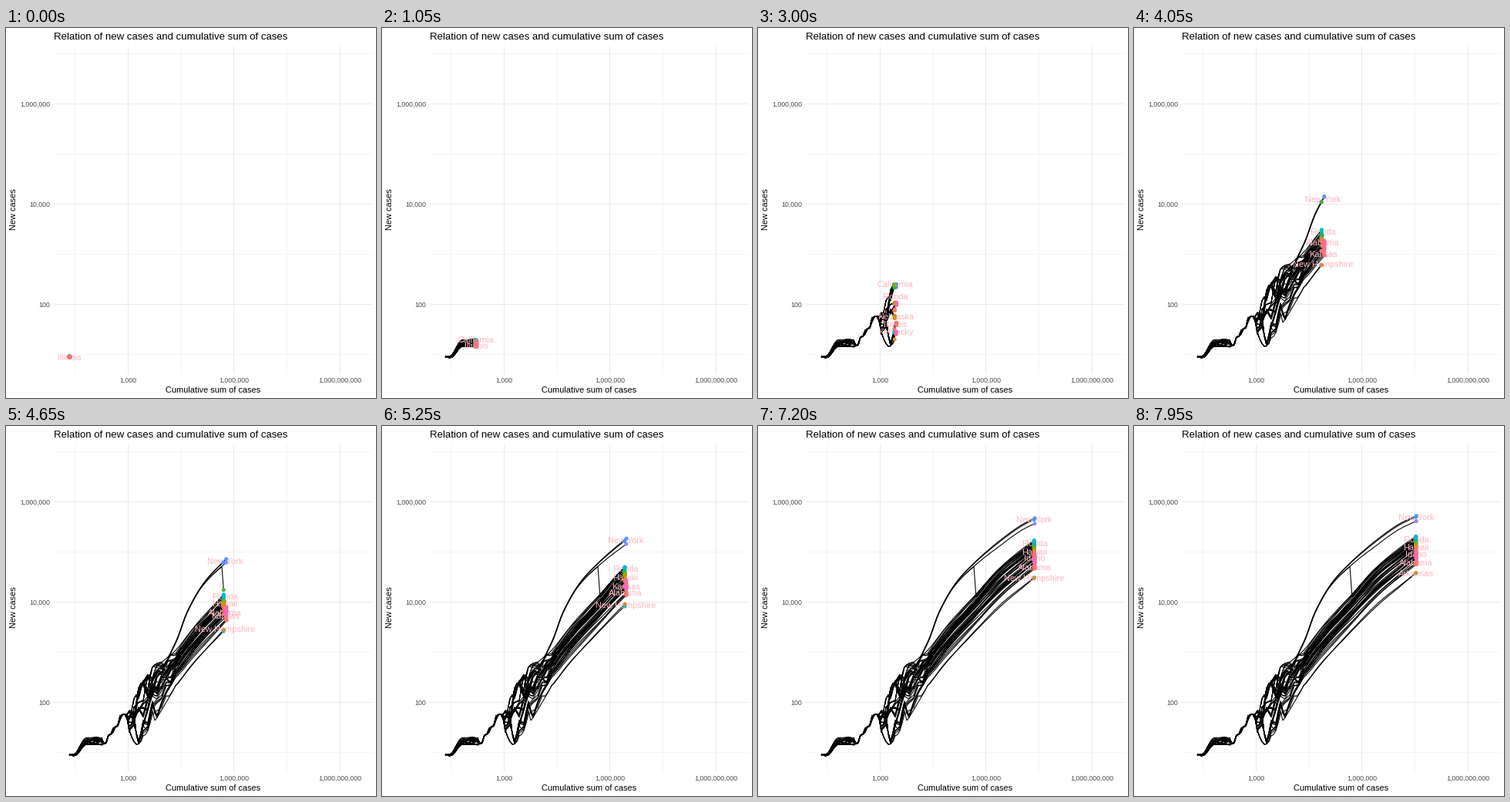
Animation, 480 px wide and 480 px high, one loop 8 s. Source, as a matplotlib script:

```python
import numpy as np
import matplotlib.pyplot as plt
from matplotlib.animation import FuncAnimation
from matplotlib.collections import LineCollection
from matplotlib.colors import LinearSegmentedColormap

SIZE, TICK, LOOP, STEP = 480, 50, 8000, 150
PER_GROUP, GROUPS = 4, 10
plt.rcParams["font.family"] = "Liberation Sans"
rng = np.random.default_rng(8)
hues = LinearSegmentedColormap.from_list("hues", [
    "#F8766D", "#CD9600", "#7CAE00", "#00BE67", "#00BFC4",
    "#00A9FF", "#C77CFF", "#FF61CC", "#F8766D"])


def curve(points):
    """Monotone cubic through the points."""
    px, py = np.array(points, float).T
    step = np.diff(px)
    rise = np.diff(py) / step
    before, after = rise[:-1], rise[1:]
    inner = np.zeros(len(before))
    np.divide(2 * before * after, before + after, out=inner, where=before * after > 0)
    slope = np.concatenate([rise[:1], inner, rise[-1:]])

    def at(x):
        i = np.clip(np.searchsorted(px, x, side="right") - 1, 0, len(step) - 1)
        h = step[i]
        s = (x - px[i]) / h
        return ((1 + 2 * s) * (1 - s) ** 2 * py[i] + s * (1 - s) ** 2 * h * slope[i]
                + s * s * (3 - 2 * s) * py[i + 1] + s * s * (s - 1) * h * slope[i + 1])
    return at


# Position of the reveal over time, then the curves that bound the bundle
head = curve([(0, 82), (1050, 122), (2100, 144.5), (3150, 185.5), (4200, 255),
              (5250, 316), (6300, 343.5), (7350, 360.5), (7950, 366)])
STAIRS = [(127, 412), (130, 411), (132, 401), (137, 400), (140, 391),
          (145, 389), (149, 375), (155, 374)]
top = curve([(82, 426), (88, 426), (104, 405), (124, 404)] + STAIRS
            + [(176, 331), (193, 310), (215, 296), (247, 257), (280, 221),
               (316, 180), (346, 156), (374, 136)])
bottom = curve([(82, 427), (88, 428), (103, 414), (122, 414)] + STAIRS
               + [(160, 398), (169, 413), (190, 386), (215, 346), (247, 304),
                  (316, 232), (346, 207), (374, 184)])
leader = curve([(208, 305), (222, 276), (235, 241), (257, 203), (281, 177),
                (317, 146), (346, 126), (374, 113)])


def between(x, rank):
    """Height at a rank from 0 (upper bound) to 1 (lower bound)."""
    return top(x) + (bottom(x) - top(x)) * rank


xs = np.arange(82, 375, 3.0)
knots = np.arange(82, 380, 6.0)
jumps = rng.normal(0, 1, (GROUPS, len(knots)))
shifts = rng.uniform(-1.2, 1.2, GROUPS)


def follower(rank, group):
    """Tracks move as a group at first and settle on their own rank later."""
    shared = (group + .5) / GROUPS
    rough = np.interp(xs, [150, 165, 195, 235], [.2, .27, .12, 0])
    wave = np.interp(xs, [160, 210, 374], [0, .06, .01])
    ranks = (shared + (rank - shared) * np.interp(xs, [165, 220], [0, 1])
             + rough * np.interp(xs, knots, jumps[group])
             + wave * np.sin(xs / 22 + rng.uniform(0, 6.3)))
    return between(np.maximum(xs + shifts[group], 82), np.clip(ranks, 0, 1))


def breakaway(group, gap, leave=999):
    """Joins the leading curve, and falls back to the bundle at leave."""
    ahead = leader(np.maximum(xs, 208)) + gap * np.interp(xs, [250, 310], [.15, 1])
    return np.where((xs > 210) & (xs < leave), ahead, follower(.1, group))


tracks, colours, lags = [], [], []


def add(ys, hue):
    tracks.append(ys)
    colours.append(hues(hue % 1))
    lags.append((25 if hue % 1 > .66 else -25) + rng.uniform(-10, 10))


add(follower(1, GROUPS - 1), .5)
add(follower(1, GROUPS - 2), .08)
add(breakaway(0, 7), .715)
add(breakaway(1, 0), .68)
add(breakaway(2, 1.5), .66)
add(breakaway(1, 8, leave=282), .3)
for i, rank in enumerate(np.sort(rng.uniform(0, .78, PER_GROUP * GROUPS))):
    hue = np.interp(rank, [0, .1, .3, .5, .78], [.47, .55, .12, -.1, -.03])
    add(follower(rank, i // PER_GROUP), hue + rng.normal(0, .05))

# Name, time shown from and to, rank at both ends (None: leading curve)
LABELS = [
    ("Illinois", 0, 3100, .9, .72), ("California", 600, 1300, 0, 0),
    ("California", 2400, 3100, .06, .06), ("Massachusetts", 2000, 2200, 0, 0),
    ("Nebraska", 2800, 3100, .6, .6), ("Kentucky", 2700, 3100, .86, .86),
    ("Massachusetts", 3100, 3200, .4, .4), ("Florida", 2500, 3200, .26, .26),
    ("Florida", 3200, LOOP, .1, .1), ("Alabama", 3200, 5250, .2, .69),
    ("Alabama", 5250, LOOP, .7, .73), ("Kansas", 3300, 5900, .83, .45),
    ("Hawaii", 4500, LOOP, .3, .32), ("Idaho", 5900, LOOP, .45, .5),
    ("New Hampshire", 3200, 7500, 1, 1), ("Arkansas", 7500, LOOP, 1, 1),
    ("New York", 3700, LOOP, None, None),
]

fig = plt.figure(figsize=(SIZE / 72, SIZE / 72), dpi=72, facecolor="white")
ax = fig.add_axes([0, 0, 1, 1])
ax.set(xlim=(0, SIZE), ylim=(SIZE, 0))
ax.axis("off")


def grid(columns, rows, width):
    for x in columns:
        ax.plot([x, x], [24, 448], color="#EBEBEB", lw=width, zorder=1)
    for y in rows:
        ax.plot([62, 475], [y, y], color="#EBEBEB", lw=width, zorder=1)


grid([89, 227, 364], range(33, 448, 130), .55)
grid([158, 295, 433], range(98, 448, 130), 1.07)

for i in range(3):
    ax.text(158 + 137.75 * i, 460, f"{1000 ** (i + 1):,}", size=8.8,
            color="#4D4D4D", ha="center")
    ax.text(57.5, 362 - 130 * i, f"{100 ** (i + 1):,}", size=8.8,
            color="#4D4D4D", ha="right")
ax.text(62, 15, "Relation of new cases and cumulative sum of cases", size=13.2)
ax.text(268.5, 473, "Cumulative sum of cases", size=11, ha="center")
ax.text(10.5, 235.5, "New cases", size=11, rotation=90, ha="center", va="center")

lines = LineCollection([], colors="black", linewidths=1.07, zorder=2)
ax.add_collection(lines, autolim=False)
tags = [ax.text(0, 0, label[0], size=11, color="#FFB6C1", ha="center", zorder=3)
        for label in LABELS]
dots = ax.scatter(np.zeros(len(tracks)), np.zeros(len(tracks)), s=25, c=colours,
                  linewidths=0, zorder=4)


def update(frame):
    now = frame * TICK // STEP * STEP
    segments, tips = [], []
    for ys, lag in zip(tracks, lags):
        x = head(max(now + lag, 0))
        n = np.searchsorted(xs, x)
        tips.append((x, np.interp(x, xs, ys)))
        segments.append(np.vstack([np.column_stack([xs[:n], ys[:n]]), tips[-1]]))
    lines.set_segments(segments)
    dots.set_offsets(tips)

    x = head(now)
    for tag, (_, start, end, first, last) in zip(tags, LABELS):
        tag.set_visible(start <= now < end)
        if first is None:
            y = leader(max(x, 208)) + 1
        else:
            y = between(x, np.interp(now, [start, end], [first, last]))
        tag.set_position((x, y + 4))
    return [lines, dots, *tags]


anim = FuncAnimation(fig, update, frames=LOOP // TICK, interval=TICK,
                     repeat=True, repeat_delay=0)
plt.show()
```
